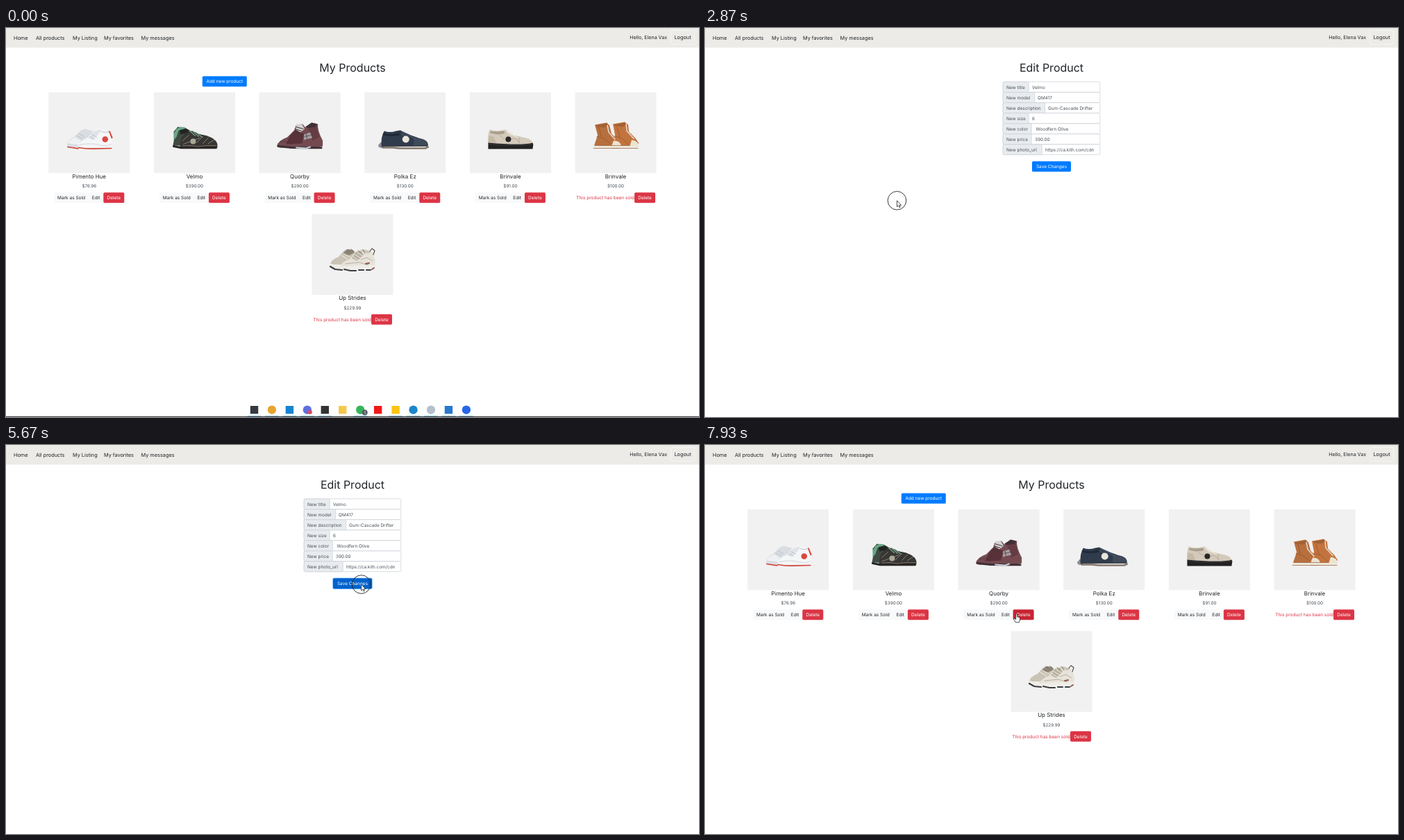
Animation of 998 by 561 pixels, one loop 8 s. Source, as an HTML page:

```html
<!DOCTYPE html>
<html lang="en">
<head>
<meta charset="utf-8">
<title>My Products</title>
<style>
  html, body { margin: 0; width: 100%; height: 100%; overflow: hidden; background: #fff; }
  svg { display: block; width: 100%; height: 100%; }
  text { font-family: Inter, "Open Sans", sans-serif; fill: #212529; text-rendering: geometricPrecision; }
</style>
</head>
<body>
<svg id="stage" viewBox="0 0 998 561"></svg>
<script>
const LOOP = 8000, FPS = 15;
const BLUE = '#007bff', RED = '#dc3545', LIGHT = '#f8f9fa';

const rect = (x, y, w, h, fill, extra = '') =>
  `<rect x="${x}" y="${y}" width="${w}" height="${h}" fill="${fill}" ${extra}/>`;
const circle = (x, y, r, fill) => `<circle cx="${x}" cy="${y}" r="${r}" fill="${fill}"/>`;
const text = (x, y, size, label, fill = '#212529', anchor = 'middle') =>
  `<text x="${x}" y="${y}" font-size="${size}" text-anchor="${anchor}" style="fill:${fill}">${label}</text>`;
const shape = (fill, d) => `<path d="${d}" fill="${fill}"/>`;
const line = (stroke, width, d) =>
  `<path d="${d}" fill="none" stroke="${stroke}" stroke-width="${width}" stroke-linecap="round" stroke-linejoin="round"/>`;
const button = (x, y, w, label, fill, color = '#fff', id = '') =>
  rect(x, y, w, 15, fill, `rx="1.7" ${id && `id="${id}"`}`) + text(x + w / 2, y + 9.8, 6.5, label, color);

// Shoes are drawn around the middle of the ground line.
const shoes = {
  white:
    shape('#d9dde2', 'M-32-6Q-31-13-21-18L-12-27-6-29 5-26 9-18 8-3-30-2Z') +
    shape('#eef0f2', 'M-31-8Q-28-14-20-17L-12-12-15-6Z') +
    shape('#f5f6f8', 'M-16-5Q-14-11-3-16L8-27 13-29 29-26Q34-15 33-3L-14-2Z') +
    shape('#dfe3e8', 'M-2-16L8-26 14-27 15-23 5-13Z') +
    line('#b3b9c1', .8, 'M-18-19L-10-15M-15-22L-7-18M1-18L8-14M4-21L11-17M14-27Q21-22 29-25') +
    line('#c3c8cf', .7, 'M-14-6Q3-9 14-6T32-7') +
    line('#d2433b', 1.7, 'M-31-3L-16-.7M-15-2Q-4 0 6-.4L32-1') +
    shape('#d9493f', 'M28-26L30-26 34-16 32-15Z') + circle(23, -14, 4.3, '#d9493f'),
  trail:
    shape('#3f4a42', 'M-31-5L-29-16-30-25-24-32-12-30-1-23 18-19 30-10V-4Z') +
    shape('#383634', 'M-21-3L-19-16-12-25-3-26 8-21Q30-18 33-7V-2H-20Z') +
    shape('#68a585', 'M-30-22L-26-29-20-32-13-31-17-26-23-26-26-17-30-13Z') +
    shape('#202422', 'M-22-27L-14-29-6-27-12-23-20-21Z') +
    line('#77a689', 1.1, 'M-8-27L1-19M-3-26L6-18M2-24L11-17') +
    line('#8f8b7d', .9, 'M-17-12L-8-20M-16-7L8-16M3-9L12-18M12-8L20-16M20-8L28-13') +
    line('#282625', 3, 'M-30-4L-19-1.8H31') +
    line('#7b6d5f', 1.1, 'M-17-4.5L-6-5 5-3.5 17-5 31-5') + circle(-2, -11, 4, '#aaa997'),
  high:
    shape('#744a50', 'M-33-4Q-32-12-18-17L-8-27-5-35 4-36 8-31 17-38 26-36Q25-27 33-12V-4L24-2H-29Z') +
    shape('#593138', 'M-14-19L-6-28 6-22 3-8-20-7Z') +
    shape('#653c43', 'M12-29L24-33 28-17 18-12Z') +
    shape('#d3d2d3', 'M-6-28L-5-36 3-36 7-29 1-24Z') +
    shape('#413036', 'M8-32L17-38 25-36 23-32 12-30Z') +
    line('#48383c', 1.1, 'M-7-29L2-26M-6-32L5-29M-10-24L0-20') +
    shape('#a69da0', 'M6-21L15-24 18-16 6-13Z') +
    line('#45343a', .7, 'M7-18L17-20M9-22L11-13M-28-10Q-18-13-12-7') +
    line('#3e3036', 3, 'M-31-4L-12-2 7-1.7H31') +
    line('#c9d4dd', 2, 'M-5-2L9-1 15-3'),
  navy:
    shape('#8a8d91', 'M-39-5L-35-10-29-5-30-1-37-2Z') +
    shape('#303b4c', 'M-34-3Q-35-14-32-22L-30-26Q-22-23-13-26L-7-27 8-20 22-15Q34-13 33-4Z') +
    shape('#202a38', 'M-31-23Q-20-20-12-23L-7-25-5-21-12-19Q-23-17-31-20Z') +
    shape('#404b5a', 'M13-16Q31-16 32-6L12-5Z') +
    line('#64707d', .8, 'M-5-25L8-18M-8-23L6-15M9-18L15-14') +
    line('#83796c', 2.6, 'M-32-2H-18L-8-1H29L33-3') +
    line('#524b44', .7, 'M-30-4L31-4') + circle(1, -14, 5, '#e9e6dc'),
  cream:
    shape('#d4cabb', 'M-32-8Q-33-20-30-28Q-21-25-12-27L-7-28 5-20 22-16Q32-14 32-7Z') +
    shape('#a99d8b', 'M-29-26Q-19-24-11-26L-8-25-9-22-19-21-29-23Z') +
    shape('#c5b9a7', 'M-31-19L-24-18-20-8H-32Z') +
    line('#eee7da', 1.2, 'M-6-26L1-20M-3-25L5-19M1-22L9-17') +
    line('#aca08e', .7, 'M-16-20L-8-14 8-15 13-9M13-16Q11-13 13-9') +
    shape('#222', 'M-32-9Q-8-7 9-7T32-9L33-7 32 0H-32Z') +
    line('#4b4b4b', .6, 'M-31-7Q5-4 32-7') + circle(-3, -14, 4, '#292725'),
  hightop:
    shape('#b76f3e', 'M-31-5L-26-20-30-35-13-38-9-34-6-22 2-14 7-9V-4Z') +
    shape('#c3743e', 'M-7-5L-1-20-4-36 13-39 18-35 19-25 28-16 33-9 31-4Z') +
    shape('#a36034', 'M-28-34L-13-37-11-34-16-31-28-32ZM-2-35L13-38 16-35 10-32-1-33Z') +
    line('#e9dccb', 1.5, 'M-12-34L-10-24-1-14M15-36L16-26 26-15') +
    line('#8f522e', .7, 'M-27-18L-17-15-8-8M-24-31L-21-18M0-18L10-15 18-7M2-31L6-17') +
    shape('#ede3d3', 'M-3-12Q7-12 8-4L-6-4ZM23-13Q33-12 33-3L20-3Z') +
    line('#eee8da', 2.8, 'M-31-3H5M-7-3H31') +
    line('#9b6b4b', .8, 'M-32-1H5M-6-1H32M-30-5H-10M-6-5H19'),
  runner:
    shape('#c9c4b6', 'M-32-9Q-31-16-20-20L-12-29-4-31 4-27 15-31 26-28 27-8Z') +
    shape('#e7e3da', 'M-18-6Q-15-13-4-17L4-27 12-29 22-25 29-27 33-15 32-5Z') +
    shape('#8d8678', 'M-14-25L-8-31 0-30 3-26-5-22Z') +
    shape('#b9b2a2', 'M-1-18L5-27 13-28 16-23 7-14Z') +
    line('#f0ece2', 1, 'M-16-22L-7-17M-13-25L-4-20M1-20L9-15M4-23L12-18M7-26L15-21') +
    line('#6c6256', .8, 'M-7-30L-4-27M-2-31L2-28M8-29L12-26M15-30L18-25') +
    line('#554840', 1.1, 'M25-28L28-32 32-29 30-23') +
    line('#aba393', .8, 'M12-16L21-19 29-14M-10-10L10-12 23-8') +
    line('#efede6', 4, 'M-31-8L-18-4 0-5 14-6 31-6') +
    line('#3c3d40', 2.2, 'M-32-6L-25-2-15-1M-12-2L-3 0H5M9-1H16M20-1H26') +
    line('#8f5148', 2, 'M19-10L24-11M28-2L31-4')
};

const products = [
  ['Pimento Hue', '$76.96', 'white'],
  ['Velmo', '$390.00', 'trail'],
  ['Quorby', '$290.00', 'high'],
  ['Polka Ez', '$130.00', 'navy'],
  ['Brinvale', '$91.00', 'cream'],
  ['Brinvale', '$100.00', 'hightop', true],
  ['Up Strides', '$229.99', 'runner', true]
];
const cardPlace = i => i < 6 ? [119.8 + 151.65 * i, 0] : [499, 175.5];

function card([name, price, shoe, sold], i) {
  const [cx, dy] = cardPlace(i), y = 237.3 + dy;
  const actions = sold
    ? text(cx - 15, y + 9.8, 6.5, 'This product has been sold', RED) + button(cx + 27, y, 30, 'Delete', RED)
    : button(cx - 50.5, y, 49.5, 'Mark as Sold', LIGHT, '#212529') +
      button(cx - 1, y, 21.5, 'Edit', LIGHT, '#212529', 'edit' + i) +
      button(cx + 20.5, y, 30, 'Delete', RED, '#fff', 'delete' + i);
  return rect(cx - 58.5, 92.8 + dy, 117, 116.5, '#f1f1f1') +
    `<g transform="translate(${cx} ${174.5 + dy})">${shoes[shoe]}</g>` +
    text(cx, 216.7 + dy, 8, name) + text(cx, 230.2 + dy, 6.3, price, '#495057') + actions;
}

const fields = [
  ['title', 37, 'Velmo', 471], ['model', 45.5, 'QM417', 479],
  ['description', 60.5, 'Gum-Cascade Drifter', 494], ['size', 37, '6', 471],
  ['color', 41, 'Woodfern Olive', 476.5], ['price', 41, '390.00', 475],
  ['photo_url', 56, 'https://ca.kith.com/cdn', 490]
];
function field([name, width, value, x], i) {
  const y = 77.7 + 15.03 * i, border = 'stroke="#ced4da" stroke-width=".8" rx="1.5"';
  return rect(429.2, y, 139.6, 14.8, '#fff', border) + rect(429.2, y, width, 14.8, '#e9ecef', border) +
    text(434, y + 9.8, 6.45, 'New ' + name, '#495057', 'start') +
    `<g clip-path="url(#inputs)">${text(x, y + 9.8, 6.4, value, '#495057', 'start')}</g>`;
}

// Colour, round?, running?
const apps = [
  ['#343a40', 0, 1], ['#e5a52f', 1, 1], ['#1683d0', 0, 1], ['#5d6fe0', 1, 1], ['#333333', 0, 1],
  ['#f5c84b', 0, 0], ['#35b45a', 1, 1], ['#f01818', 0, 0], ['#f8c513', 0, 1], ['#1d86c8', 1, 1],
  ['#b6bfcc', 1, 1], ['#2878cf', 0, 1], ['#2467e8', 1, 1]
];
const appX = i => 357.5 + 25.45 * i;
const appIcon = ([color, round, running], i) =>
  (round ? circle(appX(i), 550.7, 6.2, color) : rect(appX(i) - 5.7, 545, 11.4, 11.4, color)) +
  (running ? rect(appX(i) - 10, 559, 20, 1, '#8cc8f0') : '');

const navItems = [[11, 'Home'], [43, 'All products'], [96, 'My Listing'], [141, 'My favorites'], [194.5, 'My messages']];

const stage = document.getElementById('stage');
stage.innerHTML = `
  <defs><clipPath id="inputs">${rect(429, 70, 136, 120, '#000')}</clipPath></defs>
  ${rect(0, 0, 998, 561, '#fff')}
  ${rect(0, 0, 998, 28.3, '#ecebe7')}
  ${navItems.map(([x, label]) => text(x, 16.8, 7.35, label, '#212529', 'start')).join('')}
  ${text(952, 16.4, 7.1, 'Hello, Elena Vax', '#212529', 'end')}
  ${rect(957.7, 3.4, 33.6, 20, 'none', 'rx="2" stroke="#f8f9fa" stroke-width=".8"')}
  ${text(974.5, 15.9, 7.35, 'Logout')}
  <g id="listPage">
    ${text(499, 62.5, 16, 'My Products')}
    ${button(282.8, 69.6, 64, 'Add new product', BLUE)}
    ${products.map(card).join('')}
  </g>
  <g id="editPage">
    ${text(499, 62.5, 16, 'Edit Product')}
    ${fields.map(field).join('')}
    ${rect(470.2, 191.5, 57.6, 16.6, '#80bdff', 'rx="2.4" id="focus"')}
    ${button(471, 192.3, 56, 'Save Changes', BLUE, '#fff', 'save')}
  </g>
  <g id="taskbar">
    ${rect(0, 540, 998, 21, '#fff')}${rect(0, 560, 998, 1, '#444')}
    <g id="apps">
      ${apps.map(appIcon).join('')}
      ${circle(appX(3) + 4, 554, 3, '#e34850')}
      ${circle(appX(6) + 6.5, 554.5, 4, '#555d62')}${text(appX(6) + 6.5, 556.7, 6, '1', '#fff')}
    </g>
  </g>
  <circle id="ring" r="13.3" fill="none" stroke="#222" stroke-width=".9"/>
  <g id="cursor" fill="#fff" stroke="#222" stroke-width=".8" stroke-linejoin="round">
    <path id="arrow" d="M0 0V9L2.1 7.2 3.5 10.1 4.7 9.5 3.4 6.7H6.1Z"/>
    <path id="hand" d="M-1 1Q-1 0 0 0T1 1V4.3L4 5Q5 5.4 5 6.6 5 10 3.5 12.3H-1.5Q-2.4 10-4 8.2-4.5 6.8-3.2 6.6L-1 8Z"/>
  </g>`;
const el = Object.fromEntries([...stage.querySelectorAll('[id]')].map(node => [node.id, node]));

const path = [
  [133, 400, 575], [600, 352, 430], [1000, 305, 318], [1400, 284, 264], [1867, 276.5, 248.7],
  [3200, 276.5, 249], [3467, 283, 254], [3733, 289, 244], [3867, 289, 244], [4200, 189.7, 104.3],
  [4400, 215, 92], [4733, 365, 150], [5133, 470, 208], [5333, 520, 214], [5600, 511.7, 201],
  [6200, 511.7, 201], [6400, 470.5, 184.7], [6800, 455, 205], [7067, 440, 222], [7500, 444, 238],
  [7930, 448.7, 243.5]
];

// Monotone cubic interpolation, so the pointer never overshoots a rest.
const slope = (i, k) => (path[i + 1][k] - path[i][k]) / (path[i + 1][0] - path[i][0]);
function tangent(i, k) {
  if (i === 0 || i === path.length - 1) return 0;
  const a = slope(i - 1, k), b = slope(i, k);
  return a * b <= 0 ? 0 : 2 * a * b / (a + b);
}
function pointerAt(t) {
  if (t <= path[0][0]) return path[0].slice(1);
  const next = path.findIndex(p => p[0] > t);
  if (next < 0) return path[path.length - 1].slice(1);
  const i = next - 1, h = path[next][0] - path[i][0], u = (t - path[i][0]) / h, v = 1 - u;
  return [1, 2].map(k => path[i][k] * v * v * (1 + 2 * u) + path[next][k] * u * u * (3 - 2 * u) +
    h * u * v * (v * tangent(i, k) - u * tangent(next, k)));
}

const clamp = v => Math.max(0, Math.min(1, v));
const within = (t, a, b) => t >= a && t < b;
const show = (node, on) => node.setAttribute('visibility', on ? 'visible' : 'hidden');
const inside = (x, y, left, top, w, h) => x >= left && x <= left + w && y >= top && y <= top + h;
const clicks = [[2666, 3133], [5666, 6066]];

// Colours the hovered buttons and tells whether the pointer is over something clickable.
function hoverList(x, y, pressed) {
  let hand = false;
  products.forEach((product, i) => {
    const [cx, dy] = cardPlace(i);
    hand = hand || inside(x, y, cx - 58.5, 92.8 + dy, 117, 116.5);
    if (product[3]) return;
    const onEdit = inside(x, y, cx - 1, 237.3, 21.5, 15);
    const onDelete = inside(x, y, cx + 20.5, 237.3, 30, 15);
    el['edit' + i].setAttribute('fill', onEdit ? (pressed ? '#d3d9df' : '#dae0e5') : LIGHT);
    el['delete' + i].setAttribute('fill', onDelete ? '#c82333' : RED);
    hand = hand || inside(x, y, cx - 50.5, 237.3, 101, 15);
  });
  return hand;
}

function draw(time) {
  const t = Math.floor((time % LOOP + 4) * FPS / 1000) * 1000 / FPS;
  const [x, y] = pointerAt(t);
  const editing = within(t, 2799, 5799);
  const click = clicks.find(([a, b]) => within(t, a, b));

  show(el.listPage, !editing);
  show(el.editPage, editing);
  const hand = !editing && hoverList(x, y, !!click);
  const onSave = editing && inside(x, y, 471, 192.3, 56, 15);
  el.save.setAttribute('fill', onSave ? (click ? '#0062cc' : '#0069d9') : BLUE);
  show(el.focus, editing && onSave && click);

  const shift = 12.75 * (1 - (1 - clamp((t - 1800) / 200)) ** 2.1);
  const drop = 22 * clamp((t - 2334) / 199) ** 1.5;
  el.apps.setAttribute('transform', `translate(${shift} 0)`);
  el.taskbar.setAttribute('transform', `translate(0 ${drop})`);
  show(el.taskbar, t < 2532);

  el.cursor.setAttribute('transform', `translate(${x} ${y})`);
  show(el.arrow, t > 199 && !hand);
  show(el.hand, t > 199 && hand);
  el.ring.setAttribute('cx', x);
  el.ring.setAttribute('cy', y);
  el.ring.setAttribute('opacity', click ? 1 - clamp((t - click[0] - 220) / (click[1] - click[0] - 220)) : 0);
}

const start = performance.now();
function tick() {
  draw(performance.now() - start);
  requestAnimationFrame(tick);
}
tick();
</script>
</body>
</html>
```
